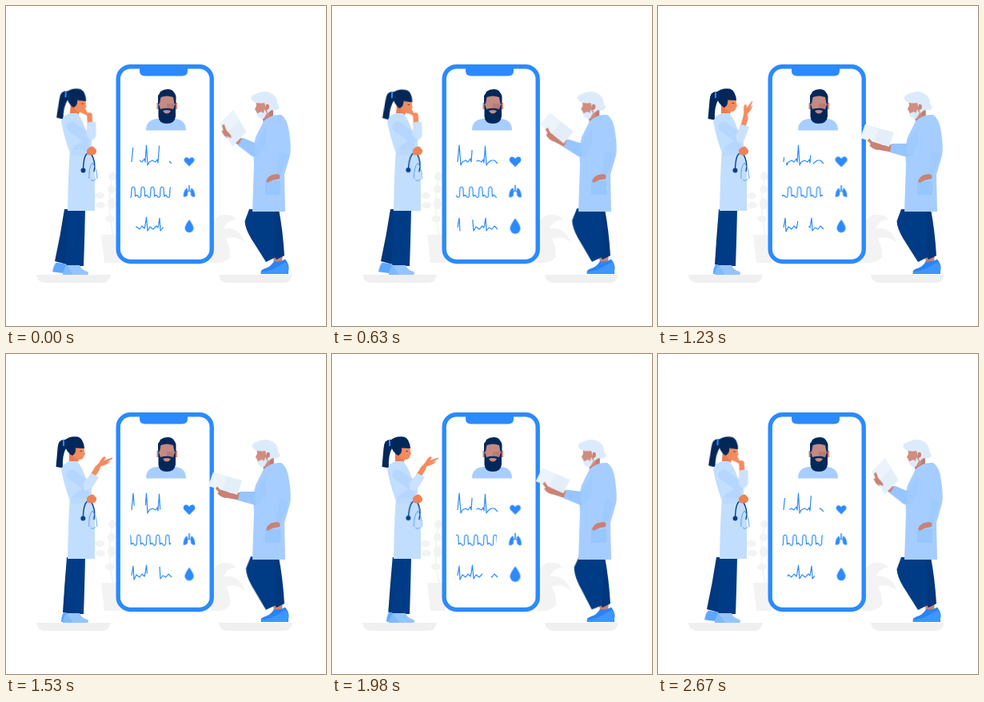
An HTML page for the animation above (2.7 s loop, 400x400 px).

```html
<!DOCTYPE html>
<html lang="en">
<head>
<meta charset="utf-8">
<title>Online consultation</title>
<style>
html, body { margin: 0; width: 100%; height: 100%; overflow: hidden; background: #fff; }
svg { display: block; width: 100%; height: 100%; }

/* vital signs */
.line { fill: none; stroke: #2b8aff; stroke-width: 1.2; stroke-linejoin: round; }
.pulse { stroke-dasharray: 102 37; animation: pulse 2700ms linear infinite; }
.blood { stroke-dasharray: 100 39; animation: blood 2700ms linear infinite; }
.breath { animation: breath 2700ms linear infinite; }
@keyframes pulse { from { stroke-dashoffset: -55px } to { stroke-dashoffset: -333px } }
@keyframes blood { from { stroke-dashoffset: -35px } to { stroke-dashoffset: -174px } }
@keyframes breath { to { transform: translateX(12px) } }
.icon { fill: #2b8aff; transform-box: fill-box; transform-origin: center; animation: beat 1350ms ease-in-out infinite; }
.heart { animation-duration: 900ms; }
.lungs { animation-name: swell; }
@keyframes beat { 0%, 100% { transform: scale(.9) } 50% { transform: scale(1.08) } }
@keyframes swell { 0%, 100% { transform: scale(.97) } 50% { transform: scale(1.04) } }

/* woman */
.w-head { transform-origin: 84px 134px; animation: w-head 2700ms ease-in-out infinite; }
.w-leg { animation: w-leg 2700ms ease-in-out infinite; }
.w-shoe { transform-origin: 84px 256px; animation: w-shoe 2700ms ease-in-out infinite; }
.w-fore { transform-origin: 101px 165px; animation: w-fore 2700ms ease-in-out infinite; }
.w-hand { transform-origin: 114px 143px; animation: w-hand 2700ms ease-in-out infinite; }
.steth { transform-origin: 105px 184px; animation: steth 2700ms ease-in-out infinite; }
@keyframes w-head {
  0%, 100% { transform: translate(1px, 0) rotate(4deg) }
  23.3% { transform: translate(1px, 1px) rotate(5deg) }
  45%, 78% { transform: none }
}
@keyframes w-leg {
  0%, 24%, 88%, 100% { d: path("M73 254Q68 287 61 319L76 323L93 254Z") }
  43%, 70% { d: path("M76 254Q73 290 71 323L84 324L92 254Z") }
}
@keyframes w-shoe {
  0%, 24%, 88%, 100% { transform: rotate(8deg) }
  43%, 70% { transform: none }
}
@keyframes w-fore {
  0%, 25%, 100% { transform: translate(5px, -3px) rotate(-34deg) }
  45.6% { transform: translate(1px, 0) rotate(-14deg) }
  54%, 75% { transform: none }
  86.7% { transform: translate(1px, -1px) rotate(-17deg) }
}
@keyframes w-hand {
  0%, 25%, 100% { transform: rotate(-66deg) scale(.75) }
  45.6% { transform: rotate(-20deg) }
  54%, 75% { transform: none }
  86.7% { transform: rotate(-29deg) }
}
@keyframes steth {
  0%, 50%, 100% { transform: rotate(0) }
  24%, 74% { transform: rotate(3deg) }
}

/* man */
.m-head { transform-origin: 325px 140px; animation: m-head 2700ms ease-in-out infinite; }
.m-fore { transform-origin: 312px 178px; animation: m-fore 2700ms ease-in-out infinite; }
.paper { transform-origin: 274px 162px; animation: paper 2700ms ease-in-out infinite; }
.m-leg { transform-origin: 332px 316px; animation: m-leg 2700ms ease-in-out infinite; }
@keyframes m-head {
  0%, 100% { transform: none }
  56%, 73% { transform: translate(.7px, 0) rotate(1deg) }
}
@keyframes m-fore {
  0%, 100% { transform: rotate(23deg) }
  23.3% { transform: rotate(17deg) }
  45.6%, 57% { transform: none }
  73.3% { transform: rotate(7deg) }
  86.7% { transform: rotate(19deg) }
}
@keyframes paper {
  0%, 100% { transform: translate(2px, 4px) rotate(10deg) scale(.8, 1.38) }
  23.3% { transform: translate(1px, 1px) rotate(5deg) scale(1, 1.04) }
  45.6%, 57% { transform: none }
  73.3% { transform: translate(0, 1px) }
  86.7% { transform: translate(1px, 1px) rotate(4deg) scale(1, 1.05) }
}
@keyframes m-leg {
  0%, 45%, 100% { transform: none }
  23.3%, 87% { transform: rotate(2deg) }
  73.3% { transform: rotate(5deg) }
}
</style>
</head>
<body>
<svg viewBox="0 0 400 400">
  <defs>
    <clipPath id="window"><path d="M155.5 220h50v26h-50z"/></clipPath>
  </defs>

  <!-- floor and plants -->
  <g fill="#f0f0f0">
    <path d="M38 336H131Q129 346 120 346H48Q39 345 38 336Z"/>
    <path d="M266 336H358Q356 346 347 346H276Q267 345 266 336Z"/>
  </g>
  <g fill="#f3f3f3">
    <path d="M119 286H142V321H123Z"/>
    <path d="M134 286Q125 250 134 207" fill="none" stroke="#f3f3f3" stroke-width="1.5"/>
    <circle cx="133" cy="213" r="5"/><circle cx="132" cy="229" r="5"/>
    <ellipse cx="117" cy="237" rx="6" ry="4"/><ellipse cx="118" cy="249" rx="6" ry="4"/>
    <ellipse cx="132" cy="247" rx="5" ry="7"/><ellipse cx="130" cy="266" rx="6" ry="4"/>
    <path d="M256 321V275Q264 259 274 261Q284 260 288 267Q277 267 272 278Q291 275 299 296Q287 286 275 291Q281 303 280 314Q272 323 256 321Z"/>
  </g>

  <!-- phone -->
  <rect x="140.200" y="75.700" width="117" height="243.800" rx="15.500" fill="#fff" stroke="#2b8aff" stroke-width="5.400"/>
  <path d="M167 76H227V81Q227 87.500 220 87.500H174Q167 87.500 167 81Z" fill="#2b8aff"/>

  <!-- patient -->
  <path d="M175 155.500Q175 142 189 141H211Q225 142 225 155.500Z" fill="#a8ceff"/>
  <g fill="#c58a82">
    <path d="M191 110H211V136H191Z"/>
    <path d="M188.500 121h3v8h-3zM211 121h3v8h-3z"/>
    <path d="M201 122H210V128H201Z" fill="#b97b78"/>
  </g>
  <g fill="#02285a">
    <path d="M190 122V112Q192 110 193 107Q197 104 202 104Q208 104 210 108Q212 110 212.500 113V122H210.500L209 114Q201 111 193.500 114L192 122Z"/>
    <path d="M190.500 121L193 129Q201 126.500 209 129L212 121V138Q211 147 201 147Q191 147 190.500 138Z"/>
    <path d="M196 131Q201 129 206 131Q204 134.500 201 134.500Q198 134.500 196 131Z" fill="#c58a82"/>
  </g>

  <!-- vital signs -->
  <path class="line pulse" d="M157 195L159 174L161 199L163 195L167 193L170 195L173 191L174 195L175.500 174L177 199L179 195L183 193L187 195L189 192L190 196L191.500 175L193 199L195 196L199 193L203 193L207 197"/>
  <g clip-path="url(#window)"><path id="breath" class="line breath"/></g>
  <path class="line blood" d="M157 277L159 265L160 282L163 276L167 279L170 275L173 278L174 274L175.500 264L177 281L180 276L184 279L188 275L190 277L192 265L193 281L196 277L200 279L203 275L207 279"/>
  <path class="icon heart" d="M229 201L222.500 194.500Q220.500 190 224.500 188.500Q227.500 188 229 191Q230.500 188 233.500 188.500Q237.500 190 235.500 194.500Z"/>
  <path class="icon lungs" d="M228.200 224h1.600v6.500l1.200 1V229Q231.500 227 233 228Q236.500 231 236.500 238.500Q234 240 231 236.500V233L229 231.500L227 233V236.500Q224 240 221.500 238.500Q221.500 231 225 228Q226.500 227 227 229V231.500L228.200 230.500Z"/>
  <path class="icon" d="M229 266Q235 274 235 278A6 6 0 0 1 223 278Q223 274 229 266Z"/>

  <!-- woman -->
  <g>
    <path class="w-leg" d="M76 254Q73 290 71 323L84 324L92 254Z" fill="#01377c"/>
    <path class="w-shoe" d="M72 323H84Q86 328 92 331V335H69Q69 327 72 323Z" fill="#5ea6ff"/>
    <path d="M76 254H99Q98 300 97 325H76Q74 322 76 300Z" fill="#003c85"/>
    <path d="M76 324H92Q94 330 102 332Q104 334 102 336H71Q72 329 76 324Z" fill="#94c5ff"/>
    <path d="M71 336Q72 328 76 324L84 336Z" fill="#80b9ff"/>

    <g class="w-head">
      <path d="M79 120H91V132L88 139H79Z" fill="#e97c50"/>
      <path d="M83 113H97L98 122L99 125L97.500 127Q97 132 92 132Q85 132 82 124Z" fill="#f28c60"/>
      <g fill="#02285a">
        <path d="M73 108Q79 102 90 103.500Q97 106 98 118L87 117.500Q88 124 83 127Q75 123 73 112Z"/>
        <path d="M74 107Q65 106 64.500 118L62.500 141L71 142.500Q70 126 75.500 117Z"/>
      </g>
      <path d="M71 107h2v8h-2z" fill="#2b8aff"/>
      <path d="M92.500 121.500h2.500" stroke="#02285a" stroke-width=".7"/>
    </g>

    <path d="M69 144Q72 136 80 134H89Q96 143 99 153L107 167V184H80Q72 162 69 144Z" fill="#c2deff"/>
    <path d="M80 180H104Q111 187 111 200V256H77Q78 202 80 180Z" fill="#c2deff"/>
    <path d="M81 180Q91 168 102 168L106 181Z" fill="#b5d6ff"/>
    <path d="M81 181H103V187H81Z" fill="#bbd9ff"/>

    <g class="steth" fill="none" stroke="#02408e" stroke-width="1.4">
      <path d="M104 184Q97 183 96.500 205"/>
      <path d="M106 184Q113 195 110 207"/>
      <path d="M104 216Q103 202 108 196Q114 204 114 216M106 217Q109 220 112 216" stroke="#579fe9" stroke-width="1"/>
      <circle cx="96.500" cy="205.500" r="2.300" fill="#02408e"/>
    </g>
    <path d="M101 180Q104 175.500 109 175.500L113 180Q114 184 109 186.500Q104 187 101 185Z" fill="#ed8358"/>

    <path d="M82 151L101 165" stroke="#b5d6ff" stroke-width="13" stroke-linecap="round"/>
    <g class="w-fore">
      <path d="M105 158L114 143" stroke="#f28c60" stroke-width="6.500" stroke-linecap="round"/>
      <g class="w-hand">
        <path d="M111 142L117 135Q119 130 123 128L125 130L122 133L133 129.500L133 131L126 135L131 134Q126 139 119 140L115 146Z" fill="#f28c60"/>
      </g>
      <path d="M97 161L107 149L116 154L107 168Q102 173 97 169Z" fill="#cae2ff"/>
    </g>
  </g>

  <!-- man -->
  <g>
    <path d="M333 308L346 308L345 321L335 321Z" fill="#c98274"/>
    <path d="M312 254Q318 284 338 317L348 312Q346 280 341 254Z" fill="#01377c"/>
    <path class="m-leg" d="M304 254L298.500 269Q299 278 306 290L325 320L337 314L335 254Z" fill="#003c85"/>
    <path d="M335 319Q342 321 349 316.500Q355 324 353 331V335H319Q317 330 324 328Q331 326 335 319Z" fill="#2b83f3"/>
    <path d="M319 332Q331 332 344 323L350 320Q355 327 352 335H320Z" fill="#3f96ff"/>

    <g class="m-head">
      <path d="M317 128H334V146H322Z" fill="#c17c70"/>
      <path d="M312 116H329V138L323 141Q315 140 313 132L311 129L313 125Z" fill="#d08d80"/>
      <path d="M307 117Q305 112 312 110Q324 104 333 110Q339 114 339 121L342 127Q339 132 332 130L327 134L325 127L323 121Q311 123 307 117Z" fill="#dcebfc"/>
      <path d="M313 135L319 132L322 134L323 129L326 134L322 141Q316 142 313 135Z" fill="#dcebfc"/>
      <path d="M325 123q4-1 4 3t-4 4z" fill="#c98274"/>
    </g>

    <path d="M322 144Q331 135 344 136Q352 141 354 158Q357 178 355 187L348 211L349 257H308L310 198Q308 177 312 164Z" fill="#a6cdff"/>
    <path d="M324 219H343V236H324Z" fill="#98c6ff"/>
    <path d="M325 219Q327 212 335 210.500L343 209.500L342 216L334 217.500L327 221Z" fill="#c98274"/>
    <path d="M342 180L353 187L343 212L338 209Z" fill="#9ecaff"/>

    <g class="m-fore">
      <path d="M293 173V183L277 180Q269 180 264 174L268 172L262 169L264 166L272 169L281 174Z" fill="#c98274"/>
      <g class="paper">
        <path d="M259 148L295 158L289 176L253 165Z" fill="#e3eef8"/>
        <path d="M259 148L276 153L270 170L253 165Z" fill="#ecf3fa"/>
      </g>
      <path d="M262 168L264 165.500L269 171L277 175L279 178L270 178Z" fill="#c98274"/>
      <path d="M292 172L314 172L319 185L312 189L290 183Z" fill="#96c5ff"/>
    </g>
    <path d="M325 153Q318 160 311 175Q310 184 314 188Q320 184 325 172Z" fill="#9ecaff"/>
  </g>
</svg>
<script>
const wave = 'q2 4 4 1l.5-10q2-4 4 0l.5 9q0 2 1 0q1-1 2 0';
document.getElementById('breath').setAttribute('d', 'M140.5 237' + wave.repeat(6));
</script>
</body>
</html>
```
